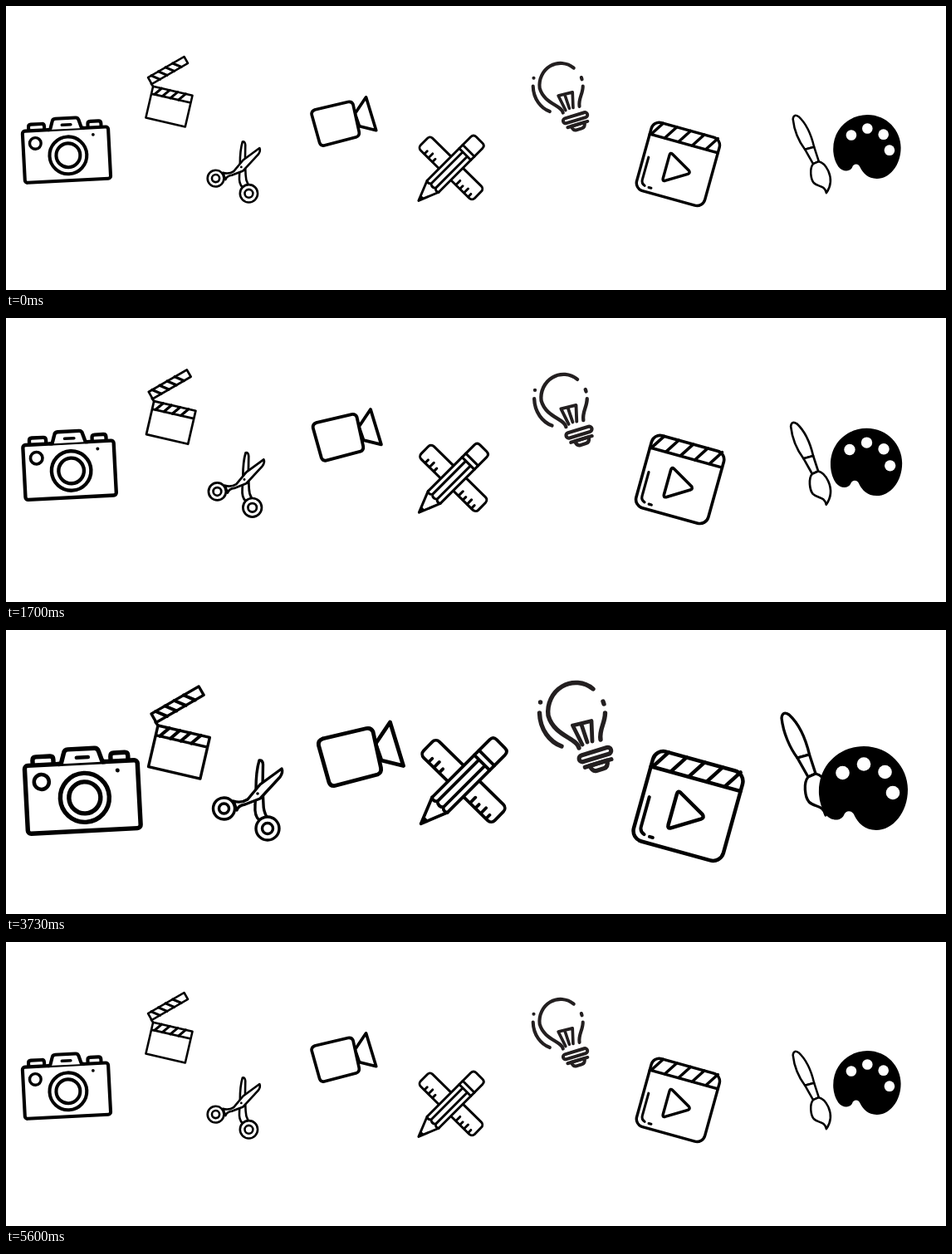
An HTML page that plays this animation: 1132x342 px, repeating every 6410 ms.

```html
<!DOCTYPE html>
<html lang="en">
<head>
<meta charset="utf-8">
<title>Creative tools</title>
<style>
html, body { margin: 0; width: 100%; height: 100%; overflow: hidden; background: #fff; }
svg { display: block; fill: #fff; stroke: #000; stroke-linecap: round; stroke-linejoin: round; }
.ink { fill: #000; stroke: none; }
.line { fill: none; }
</style>
</head>
<body>
<!-- Icons are drawn at full size; data-at is the fixed point each one scales around. -->
<svg width="1132" height="342" viewBox="0 0 1132 342">
  <g data-at="11.7 110" stroke-width="5.4">
    <g transform="translate(92.3 201) rotate(-3)">
      <path d="M-58-41v-6q0-4 4-4h17q4 0 4 4v6M36-41v-6q0-4 4-4h13q4 0 4 4v6"/>
      <rect x="-68" y="-41" width="136" height="82" rx="4"/>
      <path d="M-27-41h3l4-13q1-4 5-4h32q4 0 5 4l4 13h3"/>
      <path d="M-5-47.5h14" stroke-width="4.500"/>
      <circle cx="2.500" cy="1" r="29.500"/>
      <circle cx="2.500" cy="1" r="19"/>
      <circle cx="-48.500" cy="-20.6" r="9" stroke-width="4.500"/>
      <circle class="ink" cx="43.6" cy="-29.8" r="2.500"/>
    </g>
  </g>

  <g data-at="158.5 38.9" stroke-width="3.400">
    <path d="M180 111l3 4"/>
    <g transform="translate(175 101) rotate(-30)">
      <path d="M0 0h66v12H0z"/>
      <path d="M6 0l9 12m4-12l9 12m4-12l9 12m4-12l9 12" stroke-width="4"/>
    </g>
    <g transform="translate(183 115) rotate(13)">
      <path d="M0 0h64v51H0zM0 12h64"/>
      <path d="M14 0l-9 12m22-12l-9 12m22-12l-9 12m22-12l-9 12" stroke-width="4"/>
    </g>
  </g>

  <g data-at="221 184" stroke-width="3.400">
    <path d="M305 157Q301 170 301 192L300 211Q299 224 305 229L314 225Q310 218 310 210L309 190 309.500 162Q309 156 305 157z"/>
    <path d="M332 167L306 186 291 204Q283 209 274 206L278 217Q280 211 288 210L306 203 330 177Q334 171 332 167z"/>
    <circle cx="262.500" cy="215" r="13"/>
    <circle cx="262.500" cy="215" r="6"/>
    <circle cx="315" cy="239" r="14"/>
    <circle cx="315" cy="239" r="6.500"/>
    <circle class="ink" cx="303" cy="197" r="1.800"/>
  </g>

  <g data-at="342 106" stroke-width="4.800">
    <path d="M445 137L462.500 111 478.500 163.500 452 157z"/>
    <path d="M381 131L434 118.500q6-1 8 4L451.500 166q1 6-4 8L396 187.500q-5 1-7-4L376.500 139q-1-6 5-8z"/>
  </g>

  <g data-at="488 238" stroke-width="3.800">
    <g transform="translate(551 182) rotate(44.5)">
      <rect x="-60" y="-13.500" width="120" height="27" rx="6"/>
      <path d="M-46 13v-6m9 6v-9m9 9v-6m52 6v-9m9 9v-6m9 6v-9m9 9v-6"/>
    </g>
    <g transform="translate(499 234) rotate(-45)">
      <path d="M1 0L33-13H131q6 0 6 6V7q0 6-6 6H33z"/>
      <path class="line" d="M33-13q-3 4 1 8q-4 5 0 10q-4 4-1 8M34-5H105M34 5H105M105-13v26m8-26v26"/>
      <path class="ink" d="M0 0l10-4.500v9z"/>
    </g>
  </g>

  <g data-at="610 86" stroke="#231f20" stroke-width="5.400">
    <path class="line" d="M690 142C688 130 660 128 653 103A33.500 35 0 0 1 707 71M719 86l1 3M721.500 100C721.500 112 714 120 716 132M642.500 100C643 120 655 135 669 140M643.500 87h.1"/>
    <path class="line" d="M694 138L682.500 115 705 109.500 706 134M693 114l7 21" stroke-width="4.800"/>
    <g transform="translate(710 152) rotate(-17)" stroke-width="5.200">
      <path d="M-10 9q1 8 6 8h9q6 0 7-8z"/>
      <rect x="-20" y="-6" width="40" height="8" rx="4"/>
      <path d="M-16 9h33"/>
    </g>
  </g>

  <g data-at="771 122" stroke-width="4.500">
    <g transform="translate(821.5 212) rotate(15.5)">
      <rect x="-56" y="-56" width="112" height="112" rx="13"/>
      <path class="line" d="M-56-34H56M-40-56l-14 22m36.500-22l-14 22m36.500-22l-14 22m36.500-22l-14 22M50-56l-14 22"/>
      <path d="M-17-10q0-5 4-3L19 5q4 3 0 6L-13 31q-4 2-4-3z"/>
      <path class="line" d="M-48 2V39q0 6 6 8M-35 48h4" stroke-width="4"/>
    </g>
  </g>

  <g data-at="991 232" stroke-width="3.300">
    <path d="M953 154C944 142 936 124 934 106Q935 97 943 102C955 113 963 131 967.500 150z"/>
    <path d="M953 154L967.500 150 975 173 966 177z"/>
    <path d="M966 177C960 184 962 201 967 207C974 214 984 210 987 223C996 210 994 197 990 188Q984 175 975 173z"/>
  </g>

  <g data-at="1051 103">
    <path class="ink" d="M979 198C977 162 1005 140 1033 140C1064 140 1086 165 1086 192C1086 220 1068 241 1048 241C1034 241 1026 232 1022 224C1019 216 1011 217 1009 223C1006 230 994 231 987 222Q980 212 979 198z"/>
    <g stroke="none">
      <circle cx="1007.500" cy="172" r="8.300"/>
      <circle cx="1033" cy="161.500" r="8.300"/>
      <circle cx="1058.500" cy="171" r="8.300"/>
      <circle cx="1068" cy="196" r="8.300"/>
    </g>
  </g>
</svg>
<script>
const LOOP = 6410, STEP = 100 / 3, BEAT = 48, PEAK = 16, END = 24, REST = 0.76;

const icons = [...document.querySelectorAll('[data-at]')].map(node => ({
  node, at: node.dataset.at.split(' ').map(Number)
}));

// Steady swell to the peak, then a quick decay back to rest.
function pulse(step) {
  if (step >= END) return 0;
  return step <= PEAK ? step / PEAK : 2 ** (PEAK - step);
}

function draw(now) {
  const step = Math.floor((now % LOOP + 4) / STEP) % BEAT;
  const scale = REST + (1 - REST) * pulse(step);
  for (const { node, at: [x, y] } of icons)
    node.setAttribute('transform', `translate(${x} ${y}) scale(${scale}) translate(${-x} ${-y})`);
}

const start = performance.now();
function tick() {
  draw(performance.now() - start);
  requestAnimationFrame(tick);
}
tick();
</script>
</body>
</html>
```
